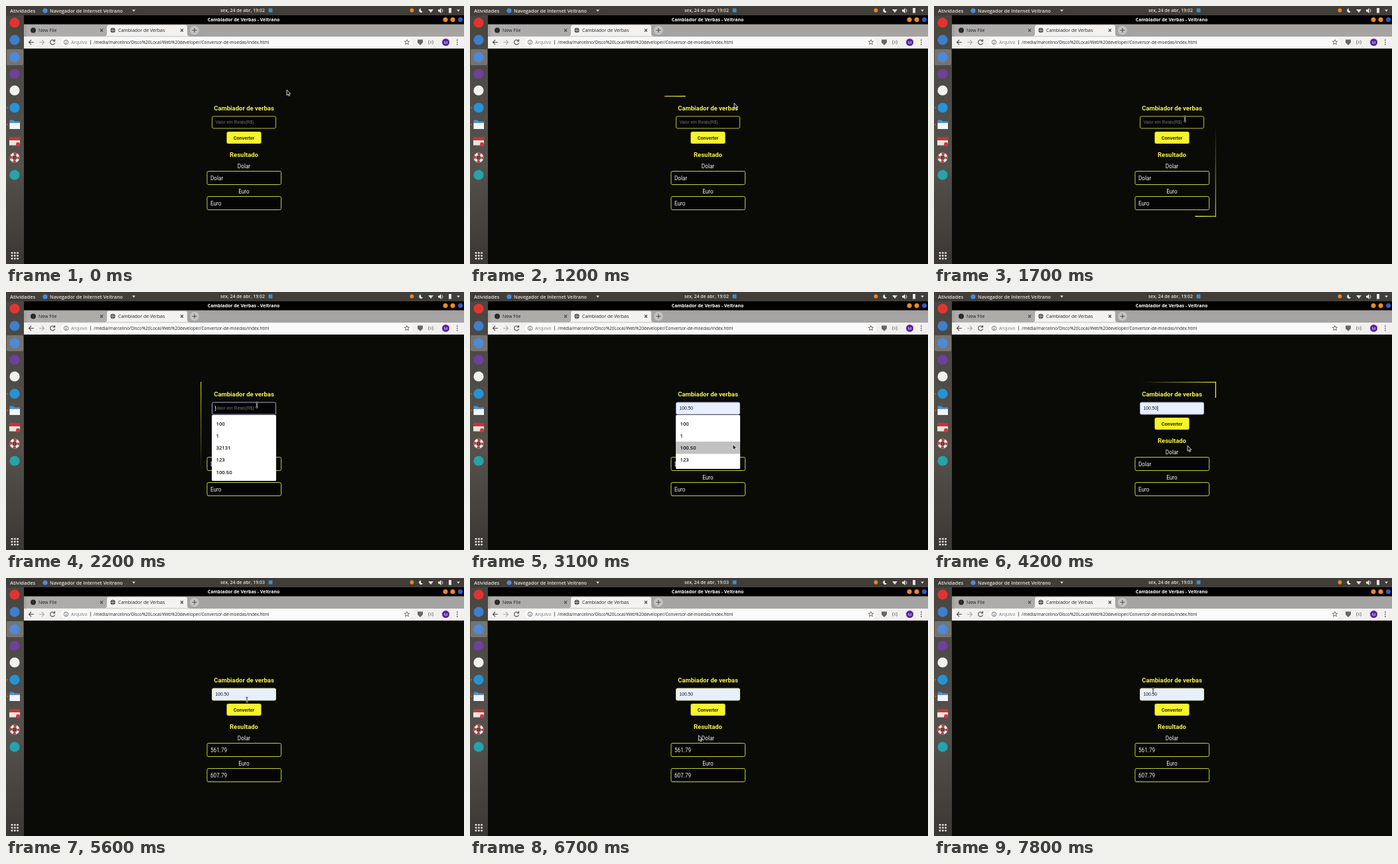
These frames come from a looping animation (690 by 388 pixels, 8 s). An HTML page:

```html
<!DOCTYPE html>
<html lang="pt-BR">
<head>
<meta charset="utf-8">
<title>Cambiador de Verbas</title>
<style>
  html, body { margin: 0; height: 100%; overflow: hidden; background: #0a0a07; }
  svg { display: block; }
  text { font: 7px "Open Sans", sans-serif; }
  .bar { font-weight: 600; fill: #e4e2de; }
  .mid { text-anchor: middle; }
  .head { font: bold 9.5px Roboto, sans-serif; fill: #f7f548; text-anchor: middle; }
  .page { font: 8.2px Roboto, sans-serif; fill: #f2f2f2; }
  .form { font: 6.7px "Liberation Sans", Arial, sans-serif; }
  .item { font-size: 7.7px; font-weight: 600; fill: #111; }
  .field { fill: #050504; stroke: #c9cd3c; }
  .icon { fill: none; stroke: #4c4c4c; stroke-width: 1.1; }
</style>
</head>
<body>
<svg width="690" height="388" viewBox="0 0 690 388">
  <defs>
    <linearGradient id="right"><stop stop-color="#f5f53c" stop-opacity="0"/><stop offset="1" stop-color="#f5f53c"/></linearGradient>
    <linearGradient id="down" href="#right" x2="0" y2="1"/>
    <linearGradient id="left" href="#right" x1="1" x2="0"/>
    <linearGradient id="up" href="#right" x2="0" y1="1" y2="0"/>
    <linearGradient id="dockFill" x2="0" y2="1"><stop stop-color="#494641"/><stop offset=".6" stop-color="#55524d"/><stop offset="1" stop-color="#3b3834"/></linearGradient>
  </defs>

  <!-- desktop bar -->
  <rect width="690" height="14" fill="#413e39"/>
  <text class="bar" x="6" y="9.5" style="font-size:7.6px">Atividades</text>
  <circle cx="59" cy="7" r="3.6" fill="#4b8bdc"/>
  <text class="bar" x="66" y="9.5" style="font-size:7.2px">Navegador de Internet Veltrano</text>
  <path d="M190 5.5h5l-2.5 3z" fill="#ddd"/>
  <text class="bar" id="clock" x="323" y="9.3" style="font-size:6.9px"></text>
  <rect x="395.500" y="3.500" width="6" height="6" rx="1" fill="#3a8fc9"/>
  <circle cx="611.500" cy="6.500" r="2.900" fill="#f58220"/>
  <path d="M625 3.500a3.200 3.200 0 1 0 3 5a3.500 3.500 0 0 1-3-5z" fill="#eee"/>
  <path d="M636 5h8l-4 5z" fill="#ddd"/>
  <path d="M651 5.500h2l2.500-2.500v8l-2.500-2.500h-2z" fill="#eee"/>
  <path d="M657 4.500q2 2.500 0 5" fill="none" stroke="#ddd"/>
  <rect x="667" y="3" width="4" height="7.500" fill="#e4e4e4"/>
  <path d="M679 5.500h5l-2.500 3z" fill="#ddd"/>

  <!-- dock -->
  <rect y="14" width="27" height="374" fill="url(#dockFill)"/>
  <rect x="1" y="65" width="25" height="24" rx="2" fill="#77746f"/>
  <g id="dock"></g>
  <path d="M5.500 171.500h6l1.500 2h8v11.500h-15.500z" fill="#4a90d9"/>
  <path d="M5.500 176h15.500v9h-15.500z" fill="#f3f3f3"/>
  <path d="M5 199h16v10.500h-16z" fill="#e9e4e0"/>
  <path d="M5 197h16v5h-16z" fill="#c33"/>
  <circle cx="18" cy="208" r="3" fill="#d8323c"/>
  <circle cx="13" cy="228" r="5.500" fill="none" stroke="#f2eeee" stroke-width="4"/>
  <circle cx="13" cy="228" r="5.500" fill="none" stroke="#d33a36" stroke-width="4" stroke-dasharray="4.320" stroke-dashoffset="2.160"/>

  <!-- browser window -->
  <rect x="27" y="14" width="663" height="13.500" fill="#020202"/>
  <text class="mid" x="358" y="23" fill="#fff" style="font-weight:700;font-size:6.9px">Cambiador de Verbas - Veltrano</text>
  <g fill="#f58a1f"><circle cx="662" cy="20.500" r="3.500"/><circle cx="673" cy="20.500" r="3.500"/><circle cx="684.500" cy="20.500" r="3.500" fill="#3458c8"/></g>
  <rect x="27" y="27.500" width="663" height="18" fill="#a5a4a3"/>
  <path d="M31 45.500v-14q0-3 3-3h115q3 0 3 3v14z" fill="#adacab"/>
  <path d="M148 45.500q4 0 4-4v-10q0-3 3-3h115q3 0 3 3v10q0 4 4 4z" fill="#f3f2f1"/>
  <circle cx="41" cy="36.500" r="4" fill="#2b2b2b"/>
  <text x="49" y="39" fill="#222">New File</text>
  <circle cx="161" cy="36.500" r="3.700" fill="#555"/>
  <path d="M157.500 36.500h7M161 33v7" stroke="#ddd" stroke-width=".6"/>
  <text x="169" y="39" fill="#222">Cambiador de Verbas</text>
  <circle cx="284" cy="36.500" r="6.800" fill="#c5c4c3"/>
  <path class="icon" d="M142 34.500l4 4m0-4l-4 4M263 34.500l4 4m0-4l-4 4M280.500 36.500h7m-3.500-3.500v7"/>
  <rect x="27" y="45.500" width="663" height="18.500" fill="#f2f1f0"/>
  <rect x="83" y="47.500" width="529" height="14" rx="7" fill="#fafafa"/>
  <path class="icon" d="M42 54.500h-7.500m3.500-3.500l-3.500 3.500l3.500 3.500M73 52.500a3.500 3.500 0 1 0 .5 3M73.500 50v3h-3"/>
  <path class="icon" d="M50 54.500h7.500m-3.500-3.500l3.500 3.500l-3.500 3.500" style="stroke:#aaa"/>
  <circle class="icon" cx="90.500" cy="54.500" r="3.200" style="stroke-width:.8"/>
  <path class="icon" d="M90.500 54v2.500M90.500 52.500v.8M127.500 51v7" style="stroke-width:.8"/>
  <text x="98" y="57" fill="#777" style="font-size:6.800px">Arquivo</text>
  <text x="132" y="57" fill="#222" style="font-size:6.500px">/media/marcelino/Disco%20Local/Web%20developer/Conversor-de-moedas/index.html</text>
  <path class="icon" d="M604 50.500l1 2.700h2.800l-2.200 1.800l.8 2.800l-2.400-1.600l-2.400 1.600l.8-2.800l-2.200-1.800h2.800z" style="stroke-width:.8"/>
  <path d="M620 50.500h8v4.500l-4 4l-4-4z" fill="#666"/>
  <path class="icon" d="M637.500 51.500q-2 3 0 6M642.500 51.500q2 3 0 6M640 52.500v4" style="stroke-width:.8"/>
  <circle cx="662.500" cy="54.500" r="5.500" fill="#5126a3"/>
  <text class="mid" x="662.500" y="56.700" fill="#fff" style="font-size:6px">M</text>
  <path d="M679 50.500h1.500v1.500h-1.500zM679 53.700h1.500v1.500h-1.500zM679 57h1.500v1.500h-1.500z" fill="#444"/>
  <rect x="27" y="64" width="663" height="324" fill="#0a0a07"/>

  <!-- converter -->
  <svg id="glow" x="293" y="135" width="132" height="182">
    <rect width="132" height="1.300" fill="url(#right)"/>
    <rect x="130.700" width="1.300" height="182" fill="url(#down)"/>
    <rect y="180.700" width="132" height="1.300" fill="url(#left)"/>
    <rect width="1.300" height="182" fill="url(#up)"/>
  </svg>
  <text class="head" x="358.500" y="157">Cambiador de verbas</text>
  <rect id="amountBox" class="field" x="310.500" y="166" width="96" height="18" rx="2"/>
  <text id="amount" class="form" x="315.500" y="177.300"></text>
  <path id="caret" stroke-width=".8"/>
  <rect x="332.500" y="189" width="52" height="18" rx="2.500" fill="#f5f52c"/>
  <text class="form mid" x="358.500" y="200.500" fill="#16160a" style="font-weight:bold">Converter</text>
  <text class="head" x="358.500" y="226.500">Resultado</text>
  <text class="page mid" x="358.500" y="244">Dolar</text>
  <rect class="field" x="303" y="248.500" width="111.500" height="20" rx="2"/>
  <text id="dollar" class="page" x="308" y="262"></text>
  <text class="page mid" x="358.500" y="282">Euro</text>
  <rect class="field" x="303" y="286.500" width="111.500" height="20" rx="2"/>
  <text id="euro" class="page" x="308" y="300"></text>

  <g id="popup">
    <rect id="list" x="310" y="185" width="97" rx="1.500" fill="#fff"/>
    <rect id="hover" x="310" y="225" width="97" height="18.500" fill="#c1c1c1"/>
    <g id="items"></g>
  </g>

  <g id="pointer">
    <path id="arrow" d="M0 0v8.300l1.900-1.700l1.300 2.700l1.300-.6l-1.300-2.600h2.500z" fill="#111" stroke="#fff" stroke-width=".8"/>
    <g id="beam" fill="none"><path d="M-1.500-3.500h3M-1.500 3.500h3M0-3.500v7" stroke="#eee" stroke-width="1.900"/><path d="M-1.500-3.500h3M-1.500 3.500h3M0-3.500v7" stroke="#222" stroke-width=".9"/></g>
  </g>
</svg>

<script>
const $ = id => document.getElementById(id);
const show = (id, on) => $(id).setAttribute("display", on ? "inline" : "none");
const clamp = v => Math.min(1, Math.max(0, v));
const circle = (x, y, r, fill) => `<circle cx="${x}" cy="${y}" r="${r}" fill="${fill}"/>`;

const apps = [[25, "#e0352f"], [51, "#3d7fcd"], [77, "#4b8bdc"], [102, "#6f3f9e"],
              [127, "#f0f2ee"], [153, "#2493d8"], [254, "#27a3ab"]];
let dock = apps.map(([y, fill]) => circle(13, y, 7.6, fill)).join("");
for (const y of [77, 153, 178]) dock += circle(2.2, y, 1.1, "#e95420");
for (let i = 0; i < 9; i++) dock += circle(9 + i % 3 * 4.3, 371.3 + Math.floor(i / 3) * 4.3, 1.4, "#eee");
$("dock").innerHTML = dock;

// pointer stops: time, x, y
const stops = [[0, 423, 126], [700, 423, 126], [1200, 398, 146], [1600, 378, 170], [2600, 378, 170],
  [3100, 396, 229], [3600, 394, 231], [3900, 382, 231], [4200, 382, 231], [4600, 366, 199], [5100, 364, 198],
  [5600, 363, 183], [5900, 355, 184], [6300, 330, 255], [6800, 348, 232], [7300, 346, 190], [7700, 327, 170], [7800, 330, 170]];

function pointerAt(t) {
  const next = stops.findIndex(s => s[0] > t);
  if (next < 0) return stops.at(-1).slice(1);
  const [t0, x0, y0] = stops[next - 1], [t1, x1, y1] = stops[next];
  const k = (t - t0) / (t1 - t0);
  return [x0 + (x1 - x0) * k, y0 + (y1 - y0) * k];
}

function drawGlow(t) {
  const phase = t < 2600 ? (t - 1140) / 1000 : t < 4200 ? 0 : .283 + (t - 4200) * .00121;
  [...$("glow").children].forEach((side, i) => {
    const p = 2 * clamp((phase - i * .25) * 2) - 1;
    const shift = i < 2 ? p : -p;
    side.setAttribute("transform", i % 2 ? `translate(0 ${shift * 182})` : `translate(${shift * 132} 0)`);
  });
}

function drawForm(t) {
  const focused = t >= 1800 && t < 4700, filled = t >= 2900, typed = t >= 2600;
  const box = $("amountBox"), amount = $("amount");
  box.style.fill = filled ? "#e8effd" : "#050504";
  box.style.stroke = focused ? "#a3a6cf" : filled ? "#d5d9a0" : "#b9bd3c";
  amount.textContent = filled ? "100.50" : typed ? "1" : "Valor em Reais(R$)";
  amount.style.fill = filled ? "#14141c" : typed ? "#eee" : "#737373";

  const previewing = t >= 2900 && t < 3600;
  show("caret", focused && !previewing && (t + 900) % 1000 < 500);
  $("caret").setAttribute("d", `M${filled ? 337 : typed ? 320 : 315.5} 171v8`);
  $("caret").setAttribute("stroke", filled ? "#111" : "#eee");

  show("popup", t >= 1900 && t < 3600);
  show("hover", previewing);
  $("list").setAttribute("height", typed ? 81 : 99);
  const items = typed ? ["100", "1", "100.50", "123"] : ["100", "1", "32131", "123", "100.50"];
  $("items").innerHTML = items.map((s, i) => `<text class="item" x="316.500" y="${200.8 + i * 18.2}">${s}</text>`).join("");

  $("dollar").textContent = t < 4900 ? "Dolar" : "561.79";
  $("euro").textContent = t < 4900 ? "Euro" : "607.79";
  $("clock").textContent = "sex, 24 de abr, 19:0" + (t < 4500 ? 2 : 3);
}

function drawPointer(t) {
  const [x, y] = pointerAt(t);
  const within = (x0, y0, x1, y1) => x >= x0 && x <= x1 && y >= y0 && y <= y1;
  const overPopup = t >= 1900 && t < 3600 && y > 185;
  const overField = !overPopup && (within(310, 166, 407, 184.5) || within(303, 248, 415, 269));
  show("beam", overField);
  show("arrow", !overField);
  $("pointer").setAttribute("transform", `translate(${x} ${y})`);
}

function frame() {
  const t = Math.floor(performance.now() % 8000 / 100) * 100;
  drawGlow(t);
  drawForm(t);
  drawPointer(t);
  requestAnimationFrame(frame);
}
frame();
</script>
</body>
</html>
```
